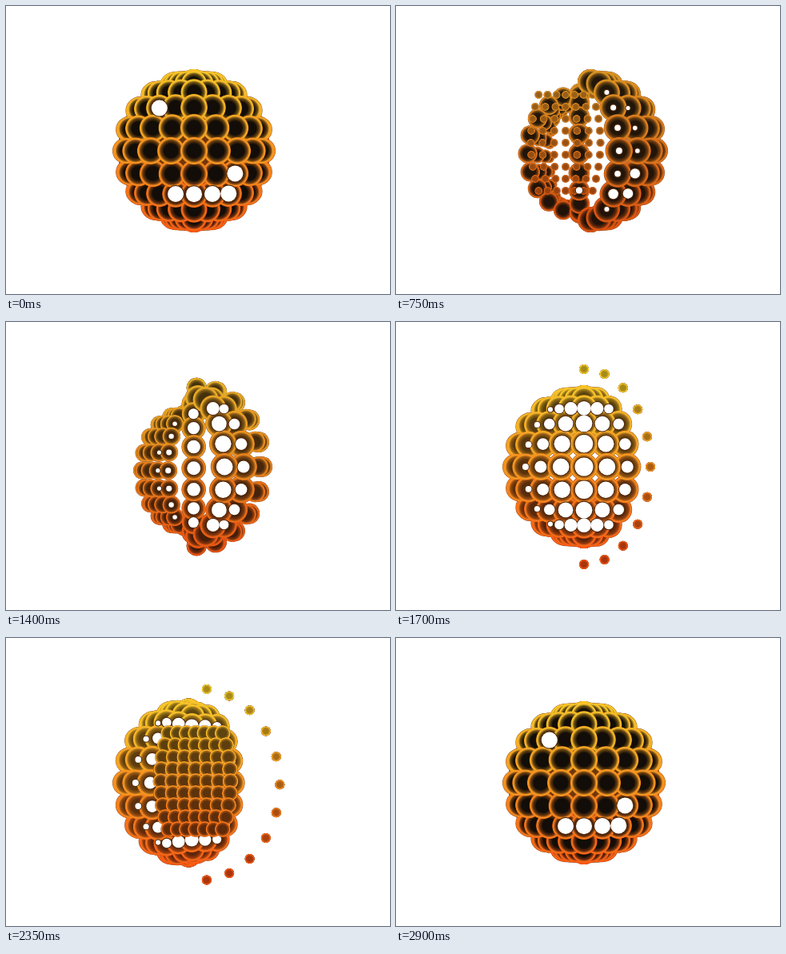
These frames come from a looping animation (480x360 px, 2.95 s). An HTML page with a canvas:

```html
<!DOCTYPE html>
<html lang="en">
<head>
<meta charset="utf-8">
<title>Glowing bead sphere</title>
<style>
html, body { margin: 0; width: 100%; height: 100%; overflow: hidden; background: #fff; }
canvas { display: block; width: 480px; height: 360px; }
</style>
</head>
<body>
<canvas id="stage" width="480" height="360"></canvas>
<script>
const ctx = document.getElementById('stage').getContext('2d');
const LOOP = 2950, STEP = 50, CX = 235, CY = 181, RADIUS = 86, BEAD = 16;
const ANGLE = Math.PI / 10;
const mix = (a, b, p) => a + (b - a) * p;
const mixAll = (a, b, p) => a.map((v, i) => mix(v, b[i], p));
const clamp = v => Math.max(0, Math.min(1, v));
const smooth = p => p * p * (3 - 2 * p);
const ease = (t, from, to) => smooth(clamp((t - from) / (to - from)));
const bump = (t, peak, width) => smooth(clamp(1 - Math.abs(t - peak) / width));
const range = (a, b) => Array.from({ length: b - a + 1 }, (_, i) => a + i);
const rgb = (c, a = 1) => `rgba(${c.map(Math.round).join()},${a})`;

// Phases of the loop, each running between 0 and 1.
function phasesAt(t) {
  const fade = ease(t, 0, 900) - ease(t, 1100, 1700);
  const open = ease(t, 500, 1100) - ease(t, 2400, 2750);
  const fly = ease(t, 1200, 1700) - ease(t, 2350, 2750);
  const stretch = bump(t, 2100, 330);
  return {
    t, open, fly, stretch,
    push: ease(t, 100, 1000) - ease(t, 1150, 1650),
    drift: ease(t, 2100, 2350),
    heat: 1 - 0.9 * fade,
    glow: 0.2 * open + 0.1 * fly + 0.18 * stretch
  };
}

// One meridian: the left ones sink into a far string, the right ones fly off as dots.
function column(k, s) {
  const u = k / 5, cos = Math.cos(k * ANGLE), late = 400 * Math.abs(u);
  const sinking = ease(s.t, 100 + late, 700 + late) - ease(s.t, 1150, 1650);
  const sink = sinking * clamp(0.35 - 3.3 * u);
  const gone = s.fly * clamp(5 * u - 2);
  const left = clamp(-2.5 * u);

  let x = CX + RADIUS * Math.sin(k * ANGLE) + 18 * s.push * cos;
  x -= 0.4 * s.stretch * Math.max(0, x - 175);
  const pole = mix(CX + 10 * s.push, 190 + 18 * Math.max(0, k + 2), s.stretch);
  const height = RADIUS + 24 * s.stretch * left;
  const bead = BEAD * (1 - 0.3 * s.stretch * (1 - left));
  const dotX = 318 + 32 * s.drift - 52 * s.stretch;

  return {
    sink, gone, cos,
    x: mix(mix(x, 191, sink), dotX, gone),
    pole: mix(mix(pole, 205, sink), mix(CX, dotX, s.stretch), gone),
    height: mix(mix(height, 55, sink), 122 - 18 * s.stretch, gone),
    r: mix(mix(bead, 6, sink), 6, gone),
    cy: CY + 9 * sink + 15 * s.stretch * gone,
    even: s.stretch * mix(0.7 * (1 - left), 1, gone)
  };
}

const isGap = (k, j) =>
  j === 2 && k >= -1 && k <= 2 || j === 1 && k === 2 || j === -2 && k === -2;

function columnBeads(k, s) {
  const col = column(k, s), solid = (1 - col.sink) * (1 - col.gone);
  return range(-5, 5).map(j => {
    const c = Math.cos(j * ANGLE), z = RADIUS * col.cos * c;
    const near = 1 / (1 - z * solid / 1040);
    const y = col.cy + col.height * mix(Math.sin(j * ANGLE), j / 5, col.even);
    const through = 0.72 * col.r * col.cos ** 2 * s.open * Math.sqrt(c);
    const gap = isGap(k, j) ? 10 * (1 - s.open) : 0;
    return {
      x: CX + (mix(col.pole, col.x, c) - CX) * near,
      y: CY + (y - CY) * near,
      z: z - 200 * col.sink,
      r: col.r * near,
      hole: Math.abs(j) < 4 ? Math.max(through, gap) * solid : 0
    };
  });
}

// Finer barrel mesh, seen while the shell is open.
function mesh(x, y, size) {
  if (size < 0.1) return [];
  return range(-4, 4).flatMap(j => range(-3, 3).map(i => ({
    x: x + 14.5 * i * (1 - 0.014 * j * j), y: y + 15 * j, z: 20, r: 10 * size
  })));
}

function dot(x, y, r) {
  ctx.beginPath();
  ctx.arc(x, y, r, 0, 2 * Math.PI);
  ctx.fill();
}

function shade({ x, y, r }, { heat, glow }) {
  const p = clamp((y - 75) / 205);
  const tone = [mix(215, 248, heat), mix(mix(145, 205, heat), 75, p), mix(36, 14, p)];
  const rim = mixAll(tone, [255, 235, 90], 0.3 * heat * (1 - 0.5 * p));
  const dark = mixAll([18, 13, 8], tone, Math.max(glow, 0.65 * clamp((9 - r) / 3)));
  const g = ctx.createRadialGradient(x, y, 0, x, y, r);
  g.addColorStop(0, rgb(dark));
  g.addColorStop(0.5, rgb(dark));
  g.addColorStop(0.74, rgb(mixAll(dark, tone, 0.38)));
  g.addColorStop(0.89, rgb(rim));
  g.addColorStop(0.95, rgb(tone));
  g.addColorStop(1, rgb(tone, 0.3));
  ctx.fillStyle = g;
  dot(x, y, r);
}

function paint(beads, s) {
  ctx.globalCompositeOperation = 'source-over';
  ctx.fillStyle = '#6e370c';
  for (const b of beads) dot(b.x, b.y, b.r);
  ctx.globalCompositeOperation = 'source-atop';
  for (const b of beads) shade(b, s);
}

function pierce(beads) {
  const holes = beads.filter(b => b.hole > 2.5);
  ctx.fillStyle = '#50280a';
  for (const b of holes) dot(b.x, b.y, b.hole + 1);
  ctx.globalCompositeOperation = 'destination-out';
  for (const b of holes) dot(b.x, b.y, b.hole);
}

function draw(t) {
  const s = phasesAt(t);
  const shell = range(-5, 5).flatMap(k => columnBeads(k, s));
  const wall = mesh(212, 171, clamp(2 - Math.abs(t - 450) / 200));
  const barrel = mesh(237, 179, clamp(2 - Math.abs(t - 2350) / 120));

  ctx.globalCompositeOperation = 'source-over';
  ctx.clearRect(0, 0, 480, 360);
  ctx.fillStyle = '#6e370c';
  if (s.open < 0.1) dot(CX, CY, 95);
  paint([...shell, ...wall].sort((a, b) => a.z - b.z), s);
  pierce(shell);
  paint(barrel, s);
}

let shown = -1;
function tick() {
  const t = Math.floor(performance.now() % LOOP / STEP) * STEP;
  if (t !== shown) draw(shown = t);
  requestAnimationFrame(tick);
}
tick();
</script>
</body>
</html>
```
